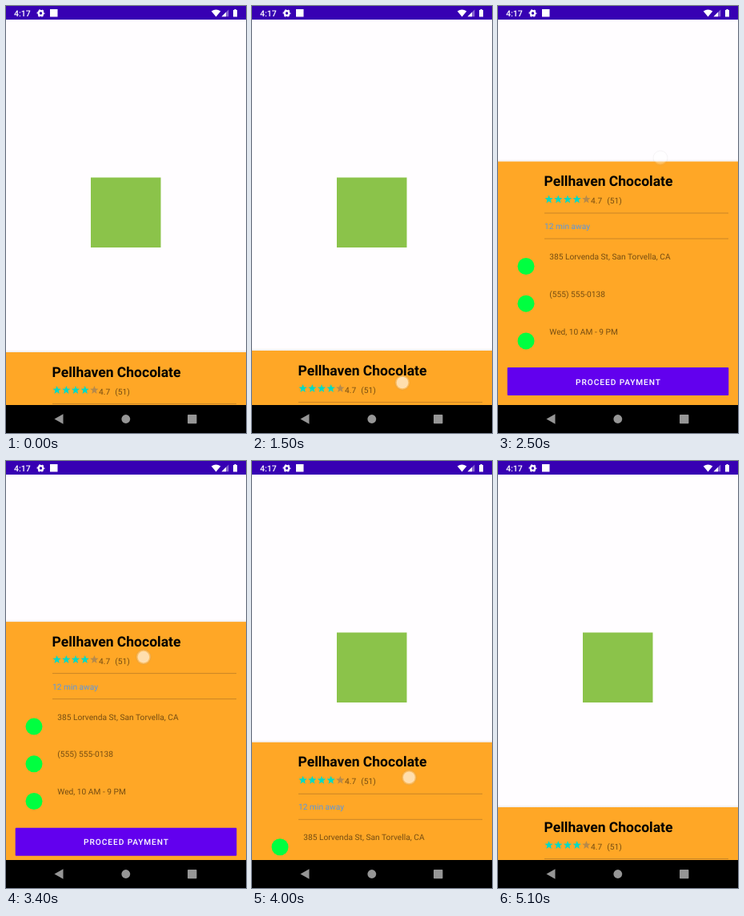
Recreate the animation shown at these times as an HTML page. Size 300 px wide and 534 px high, loop 6000 ms.

```html
<!DOCTYPE html>
<html lang="en">
<head>
<meta charset="utf-8">
<title>Bottom sheet</title>
<style>
  html, body { margin: 0; width: 100%; height: 100%; overflow: hidden; background: #fffdff; }
  svg { display: block; width: 300px; height: 534px; font: 10.2px Roboto, sans-serif; text-rendering: geometricPrecision; }
  .soft { fill: rgba(0, 0, 0, .54); }
  .rule { stroke: #c98526; }
  .mark { fill: #00ff40; }
</style>
</head>
<body>
<svg viewBox="0 0 300 534">
  <defs>
    <linearGradient id="shade" x2="0" y2="1">
      <stop offset="0" stop-opacity="0"/>
      <stop offset="1" stop-opacity=".07"/>
    </linearGradient>
    <path id="star" d="M0-5.4 1.4-1.8 5.2-1.6 2.2.8 3.2 4.6 0 2.4-3.2 4.6-2.2.8-5.2-1.6-1.4-1.8Z"/>
  </defs>

  <rect width="300" height="534" fill="#fffdff"/>
  <rect x="106" y="214.5" width="87.5" height="87.5" fill="#8bc34a"/>

  <g id="sheet">
    <rect y="-3" width="300" height="3" fill="url(#shade)"/>
    <rect width="300" height="340" fill="#ffa726"/>
    <text x="57.5" y="30.6" font-size="17.5" font-weight="700">Pellhaven Chocolate</text>
    <g id="stars"></g>
    <text class="soft" x="116" y="52.5">4.7</text>
    <text class="soft" x="136.3" y="52.5">(51)</text>
    <path class="rule" d="M58 64.5H288M58 96.5H288"/>
    <text x="58" y="84.7" fill="#5a96e0">12 min away</text>
    <g id="info"></g>
    <rect x="11.7" y="257.6" width="276.6" height="35" rx="1" fill="#6200ee"/>
    <text x="150.5" y="279" fill="#fff" font-weight="500" letter-spacing=".91" text-anchor="middle">PROCEED PAYMENT</text>
  </g>

  <g id="touch">
    <circle r="9" fill="#fff" fill-opacity=".25" stroke="#777" stroke-opacity=".15"/>
    <circle r="7.3" fill="#fff" fill-opacity=".5"/>
  </g>

  <!-- status bar -->
  <rect width="300" height="17" fill="#3700b3"/>
  <g fill="#fff">
    <text x="10" y="13" font-size="10.5" font-weight="500">4:17</text>
    <g fill="none" stroke="#fff">
      <circle cx="43.5" cy="9" r="2.8" stroke-width="2.2"/>
      <circle cx="43.5" cy="9" r="4.3" stroke-width="1.2" stroke-dasharray="2.25" stroke-dashoffset="1.1"/>
    </g>
    <rect x="55" y="4" width="9.5" height="9.5"/>
    <path d="M256.7 6.6Q262.5 2.6 268.3 6.6L262.5 13.4Z"/>
    <path d="M269.5 13.2 278.3 4.4V13.2Z" opacity=".4"/>
    <path d="M269.5 13.2 275 7.7V13.2Z"/>
    <path d="M284 5H285.4V4H287.6V5H289V13.4H284Z"/>
  </g>

  <!-- navigation bar -->
  <rect y="499" width="300" height="35"/>
  <g fill="#969696">
    <path d="M60.5 516.5 71.5 510.3V522.7Z"/>
    <circle cx="149.8" cy="516.5" r="5.4"/>
    <rect x="227" y="511" width="11.4" height="11.2" rx=".8"/>
  </g>
</svg>
<script>
  const LOOP = 6000, STEP = 100, OPEN = 194.5, CLOSED = 433;
  const up = { start: 1500, end: 2400, x: [188, 203], y: [471, 190], top: [431, 161], rest: OPEN };
  const down = { start: 3300, end: 4200, x: [165, 198], y: [220, 446], top: [176, 402], rest: CLOSED };

  const $ = id => document.getElementById(id);
  const clamp = (v, lo, hi) => Math.min(hi, Math.max(lo, v));
  const mix = ([a, b], u) => a + (b - a) * u;

  $('stars').innerHTML = [0, 1, 2, 3, 4].map(i =>
    `<use href="#star" x="${63.6 + i * 11.7}" y="47.3" fill="${i < 4 ? '#03dac5' : '#b58a4c'}"/>`).join('');

  $('info').innerHTML = ['385 Lorvenda St, San Torvella, CA', '(555) 555-0138', 'Wed, 10 AM - 9 PM']
    .map((line, i) => {
      const y = i * 46.7;
      return `<circle class="mark" cx="35" cy="${131 + y}" r="10.5"/>
        <text class="soft" x="64.3" y="${122.6 + y}">${line}</text>`;
    }).join('');

  function draw() {
    let t = Math.floor(performance.now() % LOOP / STEP) * STEP;
    if (t < up.start) t += LOOP;
    const drag = t % LOOP >= up.start && t < down.start ? up : down;

    // The sheet follows the finger, then settles once it is released.
    const u = clamp((t - drag.start) / (drag.end - drag.start), 0, 1);
    const late = Math.max(0, t - drag.end);
    const held = clamp(mix(drag.top, u), OPEN, CLOSED);
    const top = mix([drag.rest, held], Math.exp(-late / 50));
    const x = mix(drag.x, 1 - (1 - u) ** 2), y = mix(drag.y, u);

    $('sheet').setAttribute('transform', `translate(0 ${top})`);
    $('touch').setAttribute('transform', `translate(${x} ${y})`);
    $('touch').setAttribute('opacity', clamp(1 - late / 200, 0, 1));
    requestAnimationFrame(draw);
  }
  draw();
</script>
</body>
</html>
```
